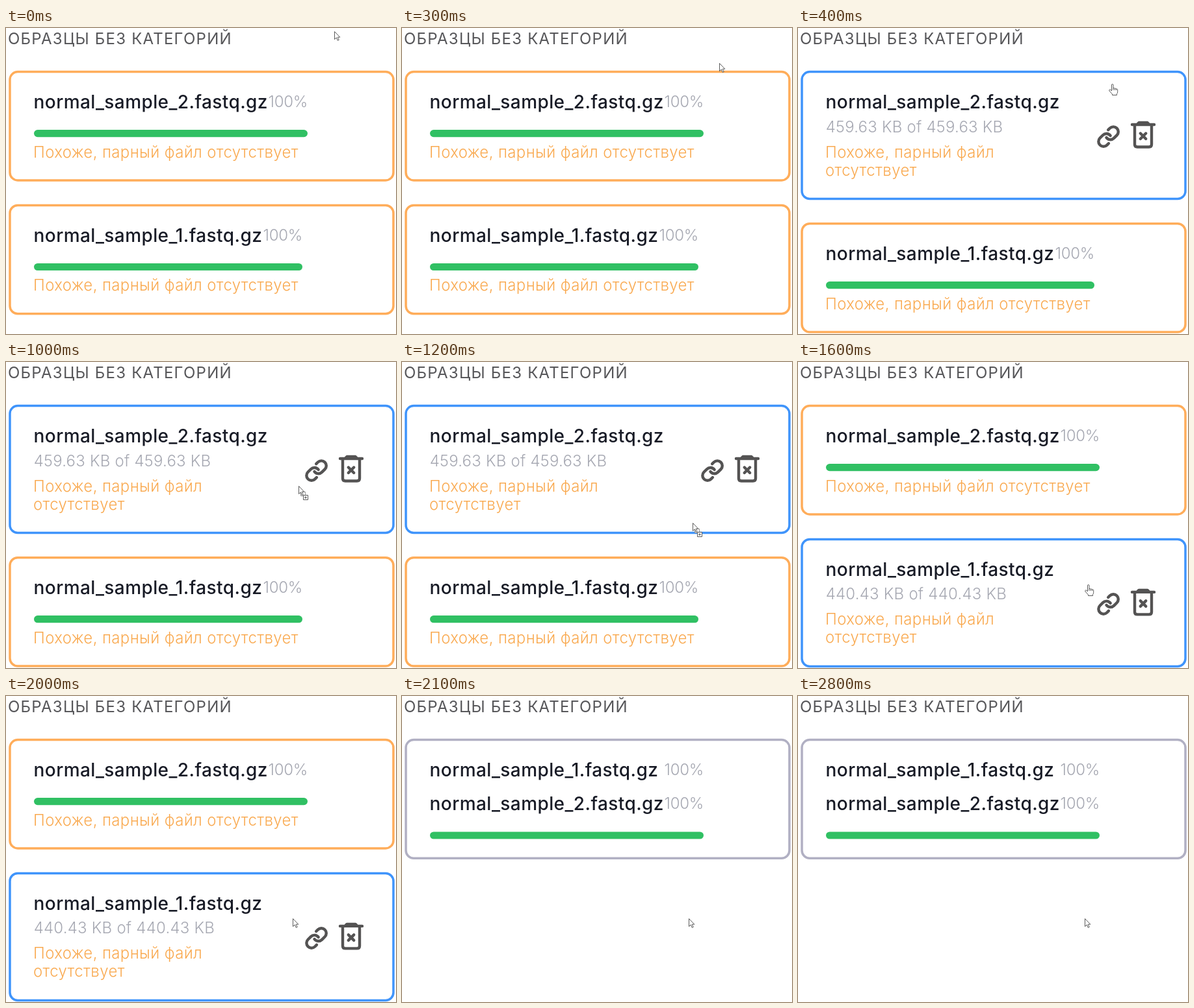
Animation of 600 by 472 pixels, one loop 3 s. Source, as an HTML page:

```html
<!DOCTYPE html>
<html lang="ru">
<head>
<meta charset="utf-8">
<title>Образцы без категорий</title>
<style>
html, body { margin: 0; width: 100%; height: 100%; overflow: hidden; background: #fff; }
svg { display: block; width: 600px; height: 472px; }
text { font-family: Inter, sans-serif; white-space: pre; }
.title { font-size: 24px; letter-spacing: 1.22px; fill: #565659; }
.name { font-size: 28px; font-weight: 500; letter-spacing: .41px; fill: #181b26; }
.info { font-size: 24px; font-weight: 300; fill: #a6a8b2; }
.done { letter-spacing: -.3px; }
.size { letter-spacing: .23px; }
.warn { font-size: 24px; font-weight: 300; letter-spacing: .37px; fill: #f9a94f; }
.box { fill: #fff; stroke-width: 3.5; }
.idle .box { stroke: #ffad5a; }
.hover .box { stroke: #3f94fb; }
.pair .box { stroke: #b1b0c3; }
.bar { fill: #30c063; }
.icon { fill: none; stroke: #545353; stroke-linecap: round; stroke-linejoin: round; }
.cursor { fill: #fff; stroke: #4a4a4a; stroke-width: .9; stroke-linejoin: round; }

/* one loop is 3 s: 1% = 30 ms */
.anim { animation: 3s step-end infinite; }
#idle1 { animation-name: idle1; }
#hover1 { animation-name: hover1; }
#idle2 { animation-name: idle2; }
#hover2 { animation-name: hover2; }
#pair { animation-name: pair; }
#pointer { animation-name: move; }
#arrow { animation-name: arrow; }
#hand { animation-name: hand; }
#drag { animation-name: drag; }

@keyframes idle1 {
  0%, 53.3333% { visibility: visible; }
  13.3333%, 70%, 100% { visibility: hidden; }
}
@keyframes hover1 {
  0%, 53.3333%, 100% { visibility: hidden; }
  13.3333% { visibility: visible; }
}
@keyframes idle2 {
  0% { visibility: visible; transform: translate(0, 205.9px); }
  13.3333% { visibility: visible; transform: translate(0, 234.1px); }
  53.3333%, 100% { visibility: hidden; transform: translate(0, 205.9px); }
}
@keyframes hover2 {
  0%, 70%, 100% { visibility: hidden; }
  53.3333% { visibility: visible; }
}
@keyframes pair {
  0%, 100% { visibility: hidden; }
  70% { visibility: visible; }
}
@keyframes arrow {
  0%, 66.6666%, 100% { visibility: visible; }
  13.3333% { visibility: hidden; }
}
@keyframes hand {
  0%, 33.3333%, 66.6666%, 100% { visibility: hidden; }
  13.3333%, 53.3333% { visibility: visible; }
}
@keyframes drag {
  0%, 53.3333%, 100% { visibility: hidden; }
  33.3333% { visibility: visible; }
}
/* speed up onto the first card, press, then drag down to the second */
@keyframes move {
  0% { transform: translate(505px, 5px); }
  3.3333% { transform: translate(502px, 11px); }
  6.6666% { transform: translate(496px, 28px); }
  10% { transform: translate(488px, 54px); }
  13.3333% { transform: translate(478px, 86px); }
  16.6666% { transform: translate(462px, 145px); }
  20% { transform: translate(450px, 191px); }
  36.6666% { transform: translate(449px, 209px); }
  40% { transform: translate(447px, 248px); }
  43.3333% { transform: translate(444px, 292px); }
  46.6666% { transform: translate(442px, 328px); }
  50% { transform: translate(441px, 344px); }
  53.3333%, 100% { transform: translate(441px, 343px); }
}
</style>
</head>
<body>
<svg viewBox="0 0 600 472">
  <defs>
    <g id="icons" class="icon">
      <g transform="translate(459.2 149.2) scale(1.53)" stroke-width="2.9">
        <path d="M10 13a5 5 0 0 0 7.54.54l3-3a5 5 0 0 0-7.07-7.07l-1.72 1.71"/>
        <path d="M14 11a5 5 0 0 0-7.54-.54l-3 3a5 5 0 0 0 7.07 7.07l1.71-1.71"/>
      </g>
      <path stroke-width="4.4" d="M514 149H548M522.5 148L524.5 146H537.5L539.5 148M518 150V179.500Q518 183.500 522 183.500H540Q544 183.500 544 179.500V150M526.800 162.500L535.200 171M535.200 162.500L526.800 171"/>
    </g>
    <path id="tip" d="M.5 .5V12.500L3.300 9.900L5.300 14.300L7.200 13.400L5.200 9.200H8.800Z"/>
  </defs>

  <text class="title" x="3" y="24.500">ОБРАЗЦЫ БЕЗ КАТЕГОРИЙ</text>
  <g id="cards"></g>

  <g id="pointer" class="anim cursor">
    <use id="arrow" class="anim" href="#tip"/>
    <path id="hand" class="anim" d="M4.500 11V2Q4.500 .5 5.700 .5T7 2V7.500Q7.200 6.300 8.300 6.500T9.400 7.800Q9.700 6.900 10.700 7.100T11.700 8.500Q12 7.700 12.900 8T13.700 9.500V12.500Q13.700 14.500 12.500 15.500V17.500H5.500V16L1 11Q.2 9.500 1.500 9T4.500 11M7 7.500V10M9.400 8V10M11.700 8.500V10"/>
    <g id="drag" class="anim">
      <rect x="3.500" y="9.500" width="7" height="6" stroke="#888"/>
      <use href="#tip"/>
      <rect x="7.500" y="14.500" width="7" height="7"/>
      <path d="M9 18H13M11 16V20"/>
    </g>
  </g>
</svg>
<script>
const text = (cls, x, y, s) => `<text class="${cls}" x="${x}" y="${y}">${s}</text>`;
const box = h => `<rect class="box" x="6" y="67.6" width="590" height="${h}" rx="12"/>`;
const bar = (y, right) => `<rect class="bar" x="43" y="${y}" width="${right - 43}" height="11.2" rx="5.6"/>`;
const name = (n, y) => text('name', 42.6, y, `normal_sample_${n}.fastq.gz`);
const done = (x, y) => text('info done', x, y, '100%');
const group = (id, cls, dy, body) =>
  `<g transform="translate(0 ${dy})"><g id="${id}" class="anim ${cls}">${body}</g></g>`;

const idle = (n, right) => box(167.3) + name(n, 124) + done(right - 60.5, 122) +
  bar(157, right) + text('warn', 42, 199.5, 'Похоже, парный файл отсутствует');

const hover = (n, kb) => box(196) + name(n, 124) +
  text('info size', 42.7, 160.5, `${kb} KB of ${kb} KB`) +
  text('warn', 42, 199.5, 'Похоже, парный файл') + text('warn', 42, 227.5, 'отсутствует') +
  '<use href="#icons"/>';

document.getElementById('cards').innerHTML =
  group('idle1', 'idle', 0, idle(2, 464)) +
  group('hover1', 'hover', 0, hover(2, '459.63')) +
  group('idle2', 'idle', 0, idle(1, 456)) +
  group('hover2', 'hover', 205.9, hover(1, '440.43')) +
  group('pair', 'pair', 0, box(182.6) + name(1, 124) + done(403.5, 122) +
    name(2, 176) + done(403.5, 174) + bar(209.4, 464));
</script>
</body>
</html>
```
